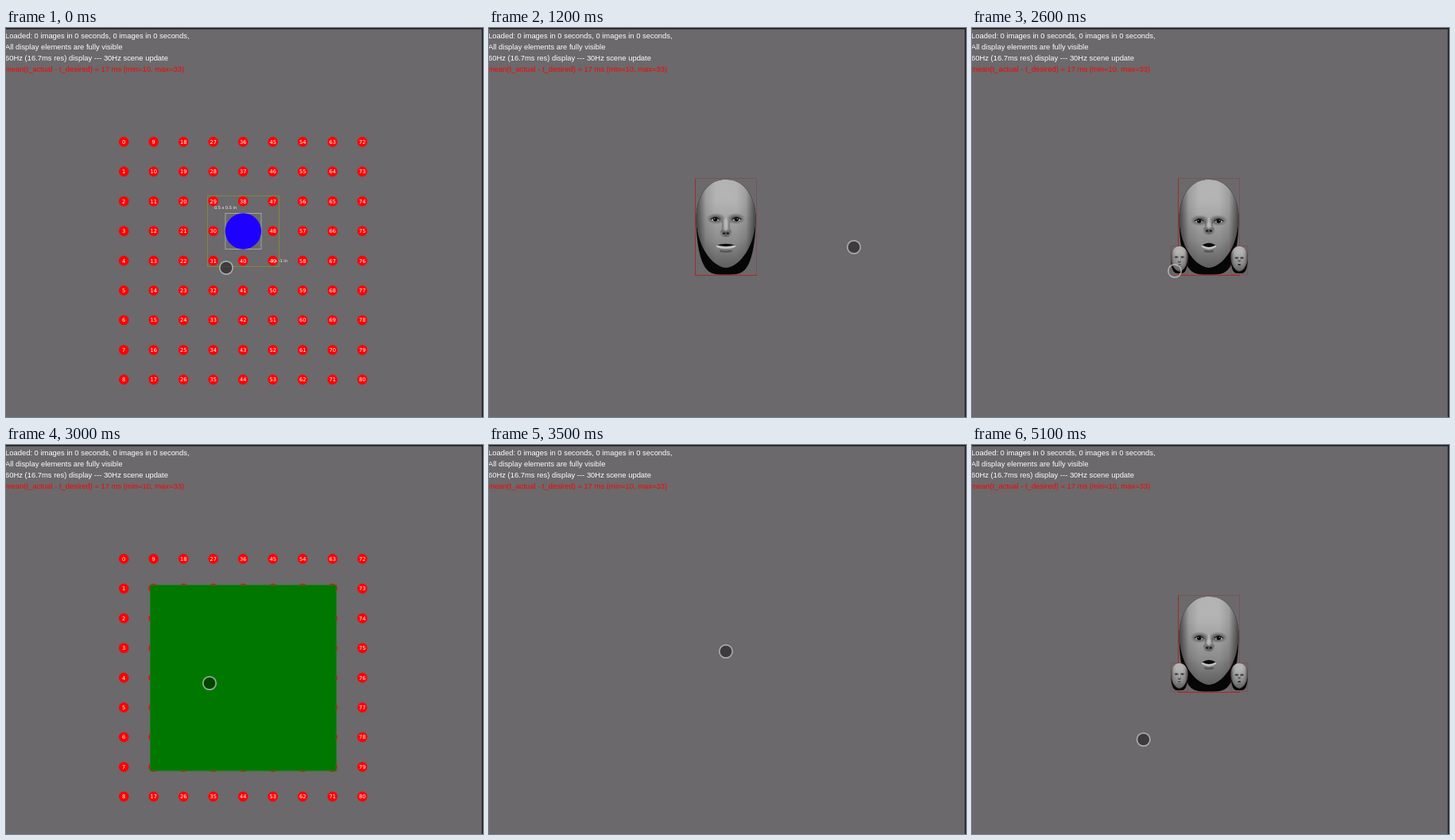
An HTML page with a canvas that plays this animation: 600 px wide and 490 px high, repeating every 5.6 s.

```html
<!DOCTYPE html>
<html>
<head>
<meta charset="utf-8">
<style>
html, body { margin: 0; width: 100%; height: 100%; overflow: hidden; background: #6b696b; }
canvas { display: block; }
</style>
</head>
<body>
<canvas id="stage" width="600" height="490"></canvas>
<script>
const g = document.getElementById('stage').getContext('2d');
const LOOP = 5600, STEP = 100;

// Pointer moves: start, end, target position
const moves = [
  [0, 300, 298, 262], [600, 1200, 459, 276], [1200, 1800, 459, 293], [2200, 2600, 255, 306],
  [2700, 3000, 256, 300], [3000, 3400, 298, 260], [3600, 4150, 205, 380], [4150, 4700, 215.7, 371]
];

const lerp = (a, b, k) => a + (b - a) * k;
const ramp = (t, a, b) => Math.max(0, Math.min(1, (t - a) / (b - a)));
const ease = k => k * k * (3 - 2 * k);
const within = (t, a, b) => t >= a && t < b;

function pointerAt(t) {
  let x = 277, y = 302;
  for (const [a, b, tx, ty] of moves) {
    const k = ease(ramp(t, a, b));
    x = lerp(x, tx, k);
    y = lerp(y, ty, k);
  }
  return [x, y];
}

function ellipse(x, y, rx, ry, fill) {
  g.fillStyle = fill;
  g.beginPath();
  g.ellipse(x, y, rx, ry, 0, 0, 7);
  g.fill();
}

function frame(x, y, w, h, color) {
  g.strokeStyle = color;
  g.lineWidth = 1;
  g.strokeRect(x, y, w, h);
}

function label(str, x, y, font, color = '#fff', align = 'center') {
  g.font = font;
  g.fillStyle = color;
  g.textAlign = align;
  g.fillText(str, x, y);
}

function stroke(d, color, width) {
  g.strokeStyle = color;
  g.lineWidth = width;
  g.stroke(new Path2D(d));
}

function shade(gradient, ...colors) {
  colors.forEach((c, i) => gradient.addColorStop(i / (colors.length - 1), c));
  return gradient;
}

function header() {
  const font = '9.42px "Liberation Sans", Arial, sans-serif';
  [
    'Loaded: 0 images in 0 seconds, 0 images in 0 seconds,',
    'All display elements are fully visible',
    '60Hz (16.7ms res) display --- 30Hz scene update',
    'mean(t_actual - t_desired) = 17 ms (min=10, max=33)'
  ].forEach((s, i) => label(s, -1, 13 + 14 * i, font, i < 3 ? '#fff' : '#f00', 'left'));
}

function grid() {
  for (let n = 0; n < 81; n++) {
    const x = 148.2 + 37.5 * Math.floor(n / 9), y = 143.4 + 37.44 * (n % 9);
    ellipse(x, y, 6.3, 6.3, '#f00');
    label(n, x, y + 2.4, '6.6px "DejaVu Sans", sans-serif');
  }
}

function fixation() {
  const font = '5px "DejaVu Sans", sans-serif';
  frame(253.5, 211.5, 90, 89, '#85853f');
  frame(276, 233.5, 45, 45, '#a5a5a5');
  ellipse(298.4, 256, 22.7, 22.7, '#1e00ff');
  label('0.5 x 0.5 in', 276, 228, font);
  label('1 x -1 in', 343.7, 295.4, font);
}

// Egg outline around y = -12: half width, height below, squareness of the lower half
function egg(w, down, power) {
  const p = new Path2D();
  for (let a = 0; a < 2 * Math.PI; a += .05) {
    const c = Math.cos(a), s = Math.sin(a);
    p.lineTo(w * Math.sign(c) * Math.abs(c) ** (s > 0 ? power : .9), -12 + s * (s > 0 ? down : 48));
  }
  p.closePath();
  return p;
}
const skull = egg(37.5, 71.5, .5), skin = egg(37.2, 63, 1.15);

function eye(y, mood) {
  g.save();
  g.translate(lerp(14, 12.3, mood), y);
  g.scale(1, .6);
  ellipse(-1, -1, 12, 12, shade(g.createRadialGradient(-1, -1, 1, -1, -1, 12), 'rgba(0,0,0,.75)', 'rgba(0,0,0,.3)', 'rgba(0,0,0,0)'));
  g.restore();
  g.save();
  g.translate(lerp(14, 12.3, mood), y);
  ellipse(0, .3, 4.8, 2.2, '#aaa');
  ellipse(0, 0, 2.8, 2.7, '#050505');
  stroke('M-5 0Q0 -4 5.5 0', '#161616', 1.2);
  ellipse(1, -.5, .6, .6, '#ddd');
  g.restore();
}

// mood: 0 = neutral, 1 = worried with open mouth
function head(x, y, size, mood) {
  const nose = lerp(9.5, 4.5, mood), lip = lerp(12.5, 8, mood), open = lerp(1, 3.2, mood);
  g.save();
  g.translate(x, y);
  g.scale(size, size);
  g.lineCap = 'round';
  g.fillStyle = '#060606';
  g.fill(skull);
  g.fillStyle = shade(g.createLinearGradient(0, -60, 0, 51), '#bababa', '#b2b2b2', '#a0a0a0', '#8c8c8c', '#7c7c7c');
  g.fill(skin);
  g.fillStyle = shade(g.createRadialGradient(0, -24, 16, 0, -14, 66), 'rgba(0,0,0,0)', 'rgba(0,0,0,.04)', 'rgba(0,0,0,.25)');
  g.fill(skin);
  g.fillStyle = shade(g.createLinearGradient(-38, 0, 38, 0),
    'rgba(0,0,0,.6)', 'rgba(0,0,0,.1)', 'rgba(0,0,0,0)', 'rgba(0,0,0,0)', 'rgba(0,0,0,0)', 'rgba(0,0,0,.1)', 'rgba(0,0,0,.6)');
  g.fill(skin);

  ellipse(0, nose, 8, 5, shade(g.createRadialGradient(0, nose, 0, 0, nose, 8), 'rgba(0,0,0,.5)', 'rgba(0,0,0,0)'));
  stroke(`M0 -10V${nose - 4}`, 'rgba(215,215,215,.45)', 3.5);
  for (const side of [-1, 1]) {
    g.save();
    g.scale(side, 1);
    eye(lerp(-11.5, -8, mood), mood);
    ellipse(2.6, nose, 1.7, 1.2, 'rgba(0,0,0,.75)');
    stroke(`M4.5 -7Q3 ${nose - 6} 6 ${nose - 2}`, 'rgba(0,0,0,.2)', 2);
    g.restore();
  }

  stroke(`M${-lip} 24Q0 ${27 + mood * 2} ${lip} 24`, '#c6c6c6', 2.4);
  g.fillStyle = '#0a0a0a';
  g.fill(new Path2D(`M${-lip - .5} 22.5Q0 ${22 - open * 1.6} ${lip + .5} 22.5Q0 ${22.5 + open * 1.5} ${-lip - .5} 22.5Z`));
  stroke(`M${-lip * .6} 30Q0 31.5 ${lip * .6} 30`, 'rgba(0,0,0,.3)', 2.6);
  g.restore();
}

function sample(mood) {
  frame(259.5, 189.5, 77, 122, 'rgba(140,45,45,.35)');
  head(298, 251, 1, mood);
  stroke('M259.5 190V311.5H337', 'rgba(190,25,25,.75)', 1);
}

function choices() {
  for (const side of [-1, 1]) {
    const x = 298.5 + side * 37.7;
    frame(x - 10.5, 274.5, 21, 36, 'rgba(150,40,40,.3)');
    head(x, 292, .285, (side + 1) / 2);
  }
}

function pointer(t) {
  const [x, y] = pointerAt(t), pressed = within(t, 2600, 2800);
  if (!pressed) ellipse(x, y, 8, 8, 'rgba(0,0,0,.43)');
  g.strokeStyle = 'rgba(190,190,190,.8)';
  g.lineWidth = 1.7;
  g.beginPath();
  g.arc(x, y, 8.2, 0, 7);
  g.stroke();
}

function draw(t) {
  g.fillStyle = '#6b696b';
  g.fillRect(0, 0, 600, 490);
  g.fillStyle = '#1e1e1e';
  g.fillRect(0, 0, 600, 1.5);
  g.fillRect(598.5, 0, 1.5, 490);
  header();

  if (t < 500 || within(t, 2900, 3500)) {
    grid();
    if (within(t, 2900, 3200)) {
      g.fillStyle = '#007800';
      g.fillRect(181, 176, 235, 234.5);
      frame(181.5, 176.5, 234, 233.5, '#1d7a1d');
    } else fixation();
  }
  if (within(t, 1000, 2900)) sample(ramp(t, 950, 1600));
  if (t >= 4200) sample(ramp(t, 4280, 4700));
  if (within(t, 1900, 2900) || t >= 4900) choices();
  pointer(t);
}

const start = performance.now();
function tick() {
  const t = (performance.now() - start) % LOOP;
  draw(Math.floor(t / STEP) * STEP);
  requestAnimationFrame(tick);
}
tick();
</script>
</body>
</html>
```
